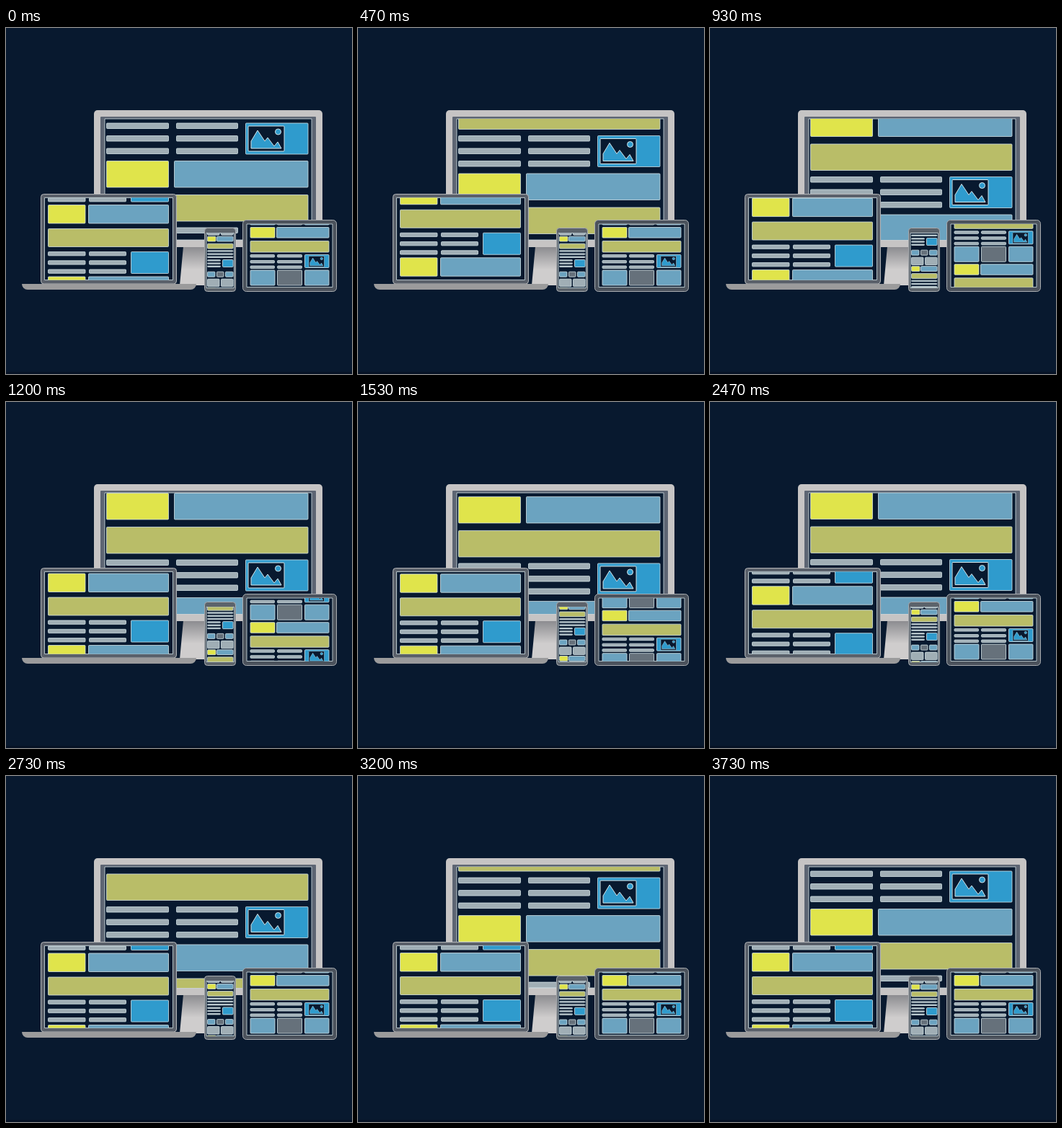
An HTML page with a canvas for the animation above (4.07 s loop, 480x480 px).

```html
<!DOCTYPE html>
<html lang="en">
<head>
<meta charset="utf-8">
<title>Responsive layouts</title>
<style>
html, body { margin: 0; height: 100%; overflow: hidden; background: #08192f; }
canvas { display: block; width: 480px; height: 480px; }
</style>
</head>
<body>
<canvas id="stage" width="480" height="480"></canvas>
<script>
const ctx = document.getElementById('stage').getContext('2d');
const LOOP = 4070, STEP = 200 / 3;
const NAVY = '#08192f', YELLOW = '#e0e44b', OLIVE = '#b9bd68', BLUE = '#6ba3c0',
      BRIGHT = '#2f9bcd', LINE = '#a0aeb5', SLATE = '#66717b', EDGE = '#d3e2e6';

// Timing: x runs from 0 to 1 between two steps.
const span = (s, from, to) => Math.min(1, Math.max(0, (s - from) / (to - from)));
const expoOut = x => x >= 1 ? 1 : 1 - 2 ** (-10 * x);
const bez = (t, a, b) => 3 * (1 - t) ** 2 * t * a + 3 * (1 - t) * t * t * b + t ** 3;
function ease(x) { // cubic-bezier(.25, .1, .25, 1)
  let lo = 0, hi = 1;
  for (let i = 0; i < 20; i++) {
    const mid = (lo + hi) / 2;
    if (bez(mid, .25, .25) < x) lo = mid; else hi = mid;
  }
  return bez(hi, .1, 1);
}

function box(x1, y1, x2, y2, r, fill, edge, width = 1) {
  ctx.beginPath();
  ctx.roundRect(x1, y1, x2 - x1, y2 - y1, r);
  ctx.fillStyle = fill;
  ctx.fill();
  if (edge) {
    ctx.strokeStyle = edge;
    ctx.lineWidth = width;
    ctx.stroke();
  }
}

const tile = (x1, x2, y, h, fill) =>
  box(x1 + .5, y + .5, x2 - .5, y + h - .5, 1, fill, EDGE, .8);

function lines(columns, rows, y, h) {
  for (const [x1, x2] of columns)
    for (const dy of rows) tile(x1, x2, y + dy, h, LINE);
}

function picture(x, y, k) {
  ctx.save();
  ctx.translate(x, y);
  ctx.scale(k, k);
  box(0, 0, 50, 35, 1, NAVY, EDGE);
  ctx.fillStyle = BRIGHT;
  ctx.beginPath();
  [[4, 31], [4, 21], [13, 6], [23, 21], [27, 16], [36, 28], [41, 22], [46, 31]]
    .forEach(p => ctx.lineTo(...p));
  ctx.closePath();
  ctx.fill();
  ctx.stroke();
  ctx.beginPath();
  ctx.arc(41.5, 8, 4, 0, 7);
  ctx.fill();
  ctx.stroke();
  ctx.restore();
}

function monitorPage(y) {
  tile(139, 226, y, 37.5, YELLOW);
  tile(233, 419.5, y, 37.5, BLUE);
  tile(139, 419.5, y + 47, 37.5, OLIVE);
  lines([[139, 226], [236, 322]], [92.5, 110, 127.5], y, 8.5);
  tile(332, 419.5, y + 92.5, 44, BRIGHT);
  picture(336, y + 97, 1);
}

function laptopPage(y) {
  tile(58, 110.5, y, 26.5, YELLOW);
  tile(114, 226, y, 26.5, BLUE);
  tile(58, 226, y + 33, 26, OLIVE);
  lines([[58, 110.5], [115, 167]], [65, 77.3, 89.5], y, 6.3);
  tile(173, 226, y + 65, 31, BRIGHT);
}

function tabletPage(y) {
  tile(338.5, 373.5, y, 15.5, YELLOW);
  tile(375, 448.5, y, 15.5, BLUE);
  tile(338.5, 448.5, y + 19, 16.5, OLIVE);
  lines([[338.5, 373], [376, 411]], [38, 46, 53.5], y, 4.5);
  tile(414, 448.5, y + 38, 19, BRIGHT);
  picture(420, y + 40.5, .43);
  tile(338.5, 373.5, y + 59.5, 22, BLUE);
  tile(376, 411, y + 59.5, 22, SLATE);
  tile(414, 448.5, y + 59.5, 22, BLUE);
}

function phonePage(y) {
  tile(279, 291.5, y, 7.8, YELLOW);
  tile(292, 315.5, y, 7.8, BLUE);
  tile(279, 315.5, y + 10, 7.8, OLIVE);
  lines([[279, 315.5]], [19.5, 23.7, 27.9], y, 2.4);
  lines([[279, 298]], [32.5, 36.7, 40.9], y, 2.4);
  tile(300, 315.5, y + 32.3, 11, BRIGHT);
  tile(279, 290.5, y + 49, 8, BLUE);
  tile(292, 302.5, y + 49, 8, SLATE);
  tile(304, 315.5, y + 49, 8, BLUE);
  tile(279, 296.5, y + 59, 11.5, LINE);
  tile(298, 315.5, y + 59, 11.5, LINE);
}

// Fills a screen with a repeating page that starts at y.
function screen(x1, y1, x2, y2, page, y, period) {
  ctx.save();
  box(x1, y1, x2, y2, 0, NAVY, EDGE, .8);
  ctx.clip();
  while (y > y1) y -= period;
  for (; y < y2; y += period) page(y);
  ctx.restore();
}

function stand() {
  const shade = ctx.createLinearGradient(0, 304, 0, 335);
  shade.addColorStop(0, '#8c8c90');
  shade.addColorStop(1, '#cfcdcd');
  ctx.fillStyle = shade;
  ctx.beginPath();
  [[246, 303], [314, 303], [319, 357], [241, 357]].forEach(p => ctx.lineTo(...p));
  ctx.fill();
}

function draw(s) {
  ctx.fillStyle = NAVY;
  ctx.fillRect(0, 0, 480, 480);
  ctx.fillStyle = '#061225';
  ctx.fillRect(0, 477, 480, 3);

  const monitor = 92 * (ease(span(s, 4, 23.7)) - ease(span(s, 35.5, 55.5)));
  const laptop = 93 * (expoOut(span(s, 1.3, 26.8)) - ease(span(s, 28.8, 42.3)));
  const tablet = -84 * ease(span(s, 7, 36));
  const phone = 71.5 * expoOut(span(s, 8, 56));

  stand();
  box(122, 114, 439, 304, 5, '#c6c4c4');
  box(131, 123, 430, 294, 1, '#5d6573');
  screen(137, 126, 424, 294, monitorPage, 184 + monitor, 145);

  box(48.5, 230.5, 236.5, 355, 4, '#5a606a', '#b5b7ba');
  screen(53.5, 235.5, 231.5, 349.5, laptopPage, 245 + laptop, 99.5);
  box(22, 355, 264, 363, [0, 0, 8, 8], '#9b9b9c');

  box(328.5, 266.5, 458.5, 365.5, 5, '#4b525c', '#a9adb1');
  screen(334, 272, 453, 359.5, tabletPage, 276 + tablet, 84);

  box(275.5, 277.5, 318.5, 365.5, 4, '#5c636b', '#a9adb1');
  screen(278, 284.5, 316.5, 360.5, phonePage, 288.7 + phone, 71.5);
}

const start = performance.now();
function tick() {
  const t = (performance.now() - start) % LOOP;
  draw(Math.floor((t + 5) / STEP));
  requestAnimationFrame(tick);
}
tick();
</script>
</body>
</html>
```
